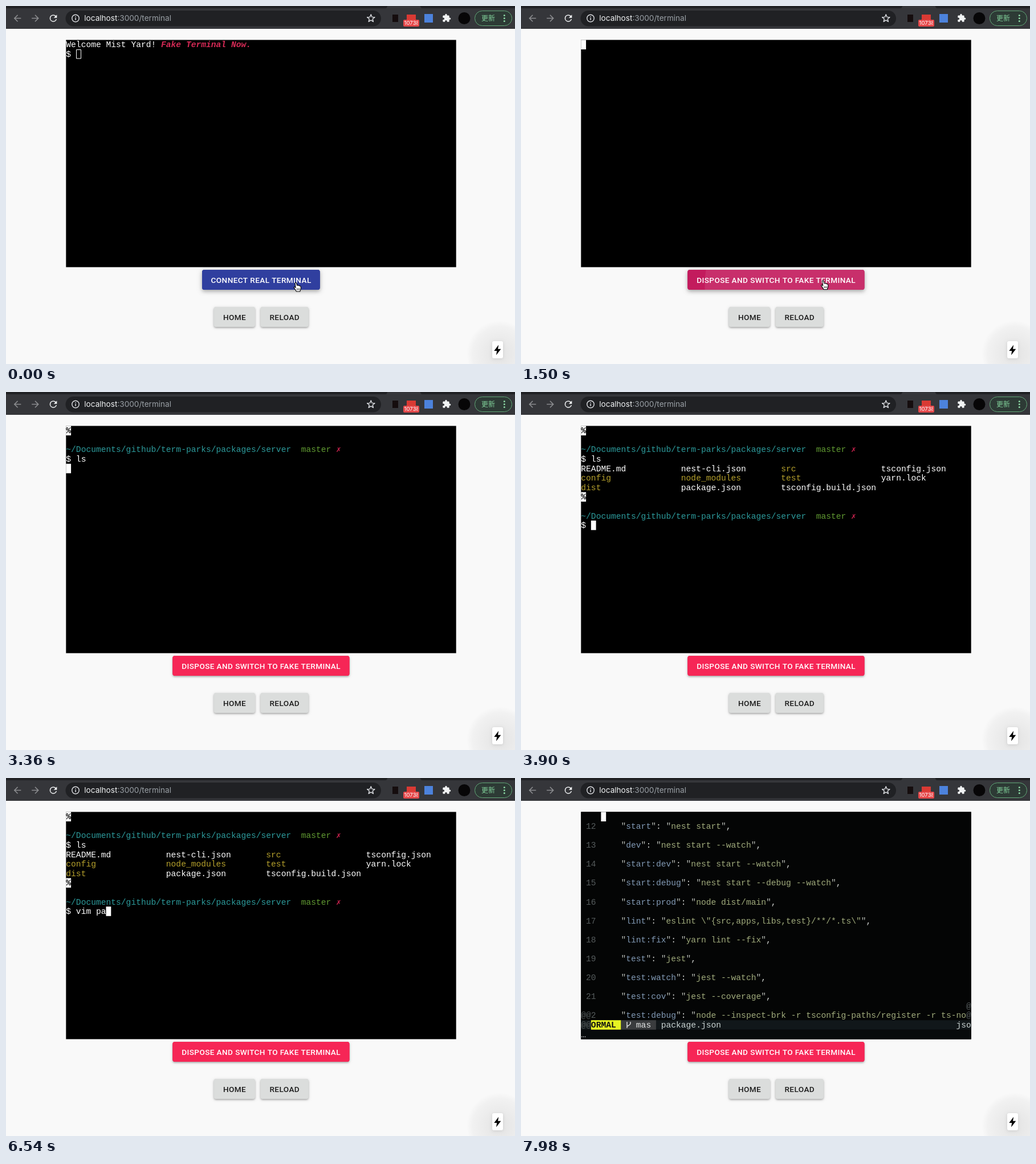
An HTML page with a canvas for the animation above (8 s loop, 893 by 627 pixels).

```html
<!DOCTYPE html>
<html lang="en">
<head>
<meta charset="utf-8">
<title>Web terminal</title>
<style>
html, body { margin: 0; width: 100%; height: 100%; overflow: hidden; background: #f9f9f9; }
canvas { display: block; width: 893px; height: 627px; }
</style>
</head>
<body>
<canvas id="stage"></canvas>
<script>
const W = 893, H = 627, LOOP = 8000, STEP = 60;
const canvas = document.getElementById('stage');
const ctx = canvas.getContext('2d');
const dpr = window.devicePixelRatio || 1;
canvas.width = W * dpr;
canvas.height = H * dpr;

const TERM = { x: 105.3, y: 59.4, w: 684.4, h: 398, cw: 8.775, ch: 16.58 };
const MONO = '14.63px "Liberation Mono", monospace';
const WHITE = '#ffffff', YELLOW = '#b5a02c', TEAL = '#2c9a9b';

// ---------- helpers ----------
const clamp = v => Math.max(0, Math.min(1, v));
const span = (t, a, b) => clamp((t - a) / (b - a));
const lerp = (a, b, k) => a + (b - a) * k;
const mix = (a, b, k) => `rgb(${a.map((v, i) => Math.round(lerp(v, b[i], k))).join(',')})`;

// cubic-bezier(.4, 0, .2, 1)
function ease(x) {
  let lo = 0, hi = 1, u = x;
  for (let i = 0; i < 24; i++) {
    u = (lo + hi) / 2;
    const v = 1 - u;
    if (1.2 * u * v * v + 0.6 * u * u * v + u * u * u < x) lo = u; else hi = u;
  }
  return 3 * u * u * (1 - u) + u * u * u;
}

function rect(x, y, w, h, color) {
  ctx.fillStyle = color;
  ctx.fillRect(x, y, w, h);
}

function round(x, y, w, h, r, color) {
  ctx.beginPath();
  ctx.roundRect(x, y, w, h, r);
  ctx.fillStyle = color;
  ctx.fill();
}

function disc(x, y, r, color) {
  ctx.beginPath();
  ctx.arc(x, y, r, 0, Math.PI * 2);
  ctx.fillStyle = color;
  ctx.fill();
}

function label(s, x, y, font, color, align = 'left', spacing = 0) {
  ctx.font = font;
  ctx.fillStyle = color;
  ctx.textAlign = align;
  ctx.letterSpacing = spacing + 'px';
  ctx.fillText(s, x, y);
  ctx.letterSpacing = '0px';
}

// 24-unit icon centred on a point
function icon(d, x, y, size, color) {
  ctx.save();
  ctx.translate(x - size / 2, y - size / 2);
  ctx.scale(size / 24, size / 24);
  ctx.fillStyle = color;
  ctx.fill(new Path2D(d));
  ctx.restore();
}

function withShadow(alpha, blur, dy, draw) {
  ctx.save();
  ctx.shadowColor = `rgba(0,0,0,${alpha})`;
  ctx.shadowBlur = blur * dpr;
  ctx.shadowOffsetY = dy * dpr;
  draw();
  ctx.restore();
}

// ---------- browser bar ----------
const ICONS = {
  back: 'M20 11H7.83l5.59-5.59L12 4l-8 8 8 8 1.41-1.41L7.83 13H20z',
  next: 'M12 4l-1.41 1.41L16.17 11H4v2h12.17l-5.58 5.59L12 20l8-8z',
  reload: 'M17.65 6.35A7.96 7.96 0 0 0 12 4a8 8 0 1 0 7.73 10h-2.08A6 6 0 1 1 12 6c1.66 0 3.14.69 4.22 1.78L13 11h7V4z',
  puzzle: 'M20.5 11H19V7c0-1.1-.9-2-2-2h-4V3.5a2.5 2.5 0 0 0-5 0V5H4c-1.1 0-2 .9-2 2v3.8h1.5a2.7 2.7 0 0 1 0 5.4H2V20c0 1.1.9 2 2 2h3.8v-1.5a2.7 2.7 0 0 1 5.4 0V22H17c1.1 0 2-.9 2-2v-4h1.5a2.5 2.5 0 0 0 0-5z',
  bolt: 'M14.5 0L4 14h6.5L9 24 20 9.5h-7z'
};

function star(x, y, r) {
  ctx.beginPath();
  for (let i = 0; i < 10; i++) {
    const a = -Math.PI / 2 + i * Math.PI / 5, q = i % 2 ? r * 0.43 : r;
    ctx.lineTo(x + Math.cos(a) * q, y + Math.sin(a) * q);
  }
  ctx.closePath();
  ctx.strokeStyle = '#dfe1e5';
  ctx.lineWidth = 1.4;
  ctx.lineJoin = 'round';
  ctx.stroke();
}

function browserBar() {
  rect(0, 0, W, 40, '#35363a');
  round(-5, -5, 674, 9, 4, '#202124');
  round(727, -5, 180, 9, 4, '#202124');
  icon(ICONS.back, 20, 21.5, 19, '#8b8c8f');
  icon(ICONS.next, 51.5, 21.5, 19, '#8b8c8f');
  icon(ICONS.reload, 83, 21.5, 19, '#f1f3f4');

  round(104.5, 8, 553.5, 27.5, 13.75, '#202124');
  ctx.beginPath();
  ctx.arc(122, 21.5, 6.2, 0, 7);
  ctx.strokeStyle = '#dfe1e5';
  ctx.lineWidth = 1.4;
  ctx.stroke();
  rect(121.3, 20.7, 1.5, 4, '#dfe1e5');
  rect(121.3, 18, 1.5, 1.5, '#dfe1e5');
  const font = '13.6px Inter, sans-serif';
  label('localhost', 137.3, 26.3, font, '#f1f3f4');
  const w = ctx.measureText('localhost').width;
  label(':3000/terminal', 137.3 + w, 26.3, font, '#9aa0a6');
  star(640.3, 21.8, 7);

  rect(678, 15, 10, 13, '#150d0e');
  rect(703, 15, 16, 11, '#d93a34');
  round(697, 24, 28, 12, 2, '#e5484a');
  ctx.save();
  ctx.beginPath();
  ctx.rect(697, 23, 25.5, 13);
  ctx.clip();
  label('10738', 698.6, 33.4, '9.6px Inter, sans-serif', WHITE);
  ctx.restore();
  rect(734, 14, 15, 15, '#4c82dc');
  icon(ICONS.puzzle, 773, 21.2, 16, '#f1f3f4');
  disc(804, 21.5, 10.5, '#070607');

  round(822.5, 8.5, 65, 26, 13, '#2d3a35');
  ctx.strokeStyle = '#62a878';
  ctx.lineWidth = 1;
  ctx.stroke();
  label('更新', 834, 26, '12px "Noto Sans CJK SC", "Noto Sans CJK JP", sans-serif', '#81d09a');
  for (const y of [16.5, 21.5, 26.5]) disc(874.3, y, 1.5, '#8bd6a3');
}

// ---------- page furniture ----------
function badge() {
  const g = ctx.createRadialGradient(866, 609, 15, 866, 609, 58);
  g.addColorStop(0, 'rgba(0,0,0,.07)');
  g.addColorStop(0.75, 'rgba(0,0,0,.03)');
  g.addColorStop(1, 'rgba(0,0,0,0)');
  rect(800, 545, 93, 82, g);
  withShadow(0.12, 5, 1, () => round(853, 587, 19, 30, 3, WHITE));
  icon(ICONS.bolt, 862.3, 602.5, 18, '#000');
}

function button(x, y, w, text, fill, ink, lift = 0) {
  const body = () => round(x, y, w, 35, 4, fill);
  withShadow(0.22, lerp(3, 6, lift), lerp(2, 3.5, lift), body);
  withShadow(0.14, lerp(5, 9, lift), 1, body);
  label(text, x + w / 2 + 0.2, y + 22.7, '500 13.6px Roboto, sans-serif', ink, 'center', 0.39);
}

const BLUE = [48, 63, 159], PINK_DARK = [195, 27, 93], PINK = [246, 38, 86];
const PRESS = 1200, SWITCH = 1260, LEAVE = 2450;

function ripple(t, x, w, cx) {
  if (t < PRESS || t > SWITCH + 550) return;
  const k = ease(span(t, PRESS, PRESS + 550));
  const fade = 1 - ease(span(t, SWITCH, SWITCH + 550));
  ctx.save();
  ctx.beginPath();
  ctx.roundRect(x, 462, w, 35, 4);
  ctx.clip();
  disc(cx, 488, 191 * k, `rgba(255,255,255,${lerp(0.1, 0.3, k) * fade})`);
  ctx.restore();
}

function mainButton(t) {
  const real = t >= SWITCH;
  const x = real ? 292.3 : 344, w = real ? 310.2 : 206.8;
  const leave = ease(span(t, LEAVE, LEAVE + 250));
  const fill = !real ? mix(BLUE, BLUE, 0)
    : t < LEAVE ? mix(BLUE, PINK_DARK, ease(span(t, SWITCH, SWITCH + 250)))
    : mix(PINK_DARK, PINK, leave);
  const text = real ? 'DISPOSE AND SWITCH TO FAKE TERMINAL' : 'CONNECT REAL TERMINAL';
  button(x, 462, w, text, fill, WHITE, 1 - leave);
  ripple(t, x, w, x + 188);
}

// ---------- terminal ----------
const colX = c => TERM.x + c * TERM.cw;
const rowY = r => TERM.y + r * TERM.ch;

function put(r, c, s, color = WHITE, style = '') {
  ctx.font = style + ' ' + MONO;
  ctx.fillStyle = color;
  ctx.textAlign = 'left';
  [...s].forEach((ch, i) => {
    if (ch !== ' ') ctx.fillText(ch, colX(c + i), rowY(r) + 12.9);
  });
}

function cells(r, c, n, color) {
  rect(colX(c), rowY(r), n * TERM.cw, TERM.ch, color);
}

function prompt(r) {
  cells(r, 0, 1, WHITE);
  put(r, 0, '%', '#000', 'bold');
  put(r + 2, 0, '~/Documents/github/term-parks/packages/server', TEAL);
  put(r + 2, 47, 'master', '#619b32');
  label('✗', colX(54), rowY(r + 2) + 12.9, '14px "DejaVu Sans Mono", monospace', '#cc234f');
  put(r + 3, 0, '$');
}

const FILES = [
  ['README.md', 'nest-cli.json', '*src', 'tsconfig.json'],
  ['*config', '*node_modules', '*test', 'yarn.lock'],
  ['*dist', 'package.json', 'tsconfig.build.json']
];

function listing(r) {
  FILES.forEach((line, i) => line.forEach((name, j) => {
    const dir = name[0] === '*';
    put(r + i, j * 20, dir ? name.slice(1) : name, dir ? YELLOW : WHITE);
  }));
}

// key press times for each typed character
const typed = (text, times, t) => text.slice(0, times.filter(k => t >= k).length);
const LS_KEYS = [2940, 3060];
const VIM_KEYS = [6120, 6240, 6300, 6420, 6480, 6540, 6660, 6720];
const ENTER_LS = 3240, LIST = 3420, TAB = 7020, ENTER_VIM = 7320, CLEAR = 7500, VIM = 7620;
const DARK = [[2400, 2940], [3960, 4560], [5100, 5580]];

function shell(t) {
  const lit = !DARK.some(([a, b]) => t >= a && t < b);
  const cursor = (r, c) => lit && cells(r, c, 1, WHITE);
  if (t < SWITCH) {
    put(0, 0, 'Welcome Mist Yard!');
    put(0, 19, 'Fake Terminal Now.', '#d62a56', 'italic bold');
    put(1, 0, '$');
    ctx.strokeStyle = WHITE;
    ctx.lineWidth = 1;
    ctx.strokeRect(123.5, 76.5, 8, 15.5);
    return;
  }
  if (t < 1800) return cursor(0, 0);
  prompt(0);
  const ls = typed('ls', LS_KEYS, t);
  put(3, 2, ls);
  if (t < ENTER_LS) return cursor(3, 2 + ls.length);
  if (t < LIST) return cursor(4, 0);
  listing(4);
  prompt(7);
  const cmd = t >= TAB ? 'vim package.json ' : typed('vim pack', VIM_KEYS, t);
  put(10, 2, cmd);
  if (t < ENTER_VIM) cursor(10, 2 + cmd.length); else cursor(11, 0);
}

const SCRIPTS = [
  ['start', 'nest start'],
  ['dev', 'nest start --watch'],
  ['start:dev', 'nest start --watch'],
  ['start:debug', 'nest start --debug --watch'],
  ['start:prod', 'node dist/main'],
  ['lint', 'eslint \\"{src,apps,libs,test}/**/*.ts\\"'],
  ['lint:fix', 'yarn lint --fix'],
  ['test', 'jest'],
  ['test:watch', 'jest --watch'],
  ['test:cov', 'jest --coverage'],
  ['test:debug', 'node --inspect-brk -r tsconfig-paths/register -r ts-no']
];

function editor() {
  const quote = '#b4b8b2', dim = '#555b5c';
  rect(TERM.x, TERM.y, TERM.w, TERM.h, '#040505');
  cells(0, 4, 1, WHITE);
  SCRIPTS.forEach(([key, value], i) => {
    const r = 1 + i * 2, last = i === SCRIPTS.length - 1;
    let c = 8;
    const add = (s, color) => { put(r, c, s, color); c += s.length; };
    if (last) put(r, 0, '@@2', dim);
    else put(r, 1, String(12 + i), dim);
    add('"', quote);
    add(key, '#8199b4');
    add('"', quote);
    add(': ', '#d0d3d0');
    add('"', quote);
    add(value, '#a0ab7c');
    if (!last) {
      add('"', quote);
      if (i < SCRIPTS.length - 1) add(',', '#d0d3d0');
    }
  });
  put(20, 77, '@', dim);
  put(21, 77, '@', dim);
  rect(TERM.x, rowY(22), TERM.w, TERM.ch, '#11171a');
  rect(TERM.x, rowY(23), TERM.w, TERM.ch, '#080b0c');
  put(22, 0, '@@', dim);
  cells(22, 2, 6, '#e6f322');
  put(22, 2, 'ORMAL', '#111', 'bold');
  cells(22, 8, 7, '#3a3c3e');
  ctx.beginPath();
  ctx.moveTo(186, 427);
  ctx.lineTo(186, 438);
  ctx.moveTo(192, 427);
  ctx.lineTo(192, 430);
  ctx.quadraticCurveTo(192, 432, 186, 435);
  ctx.strokeStyle = '#e4e6e6';
  ctx.lineWidth = 1.4;
  ctx.stroke();
  put(22, 11, 'mas', '#e4e6e6');
  put(22, 16, 'package.json', '#c9d3d2');
  put(22, 75, 'jso', '#c9d3d2');
  put(23, 0, '…', '#d8d8d8');
}

function terminal(t) {
  rect(TERM.x, TERM.y, TERM.w, TERM.h, '#000');
  if (t < CLEAR) shell(t);
  else if (t < VIM) cells(0, 0, 1, WHITE);
  else editor();
}

// ---------- mouse pointer ----------
const HAND = new Path2D('M-4 -6.5C-4 -8 -1.8 -8 -1.4 -6.6L-.5 -2.6C.2 -3.4 1.8 -3.2 2 -2.2C2.8 -2.8 4.2 -2.4 4.3 -1.4C5.2 -1.8 6.3 -1.2 6.3 0L6.3 2.6C6.3 5 5 5.6 4.8 8L-1.8 8C-2 6 -4.6 3.6 -5.6 1.4C-6.2 0 -4.6 -.6 -3.4 .8L-2.8 1.4Z');
const BEAM = new Path2D('M-4 -8H-1.2L0 -7L1.2 -8H4M0 -7V7M-4 8H-1.2L0 7L1.2 8H4M-2 2H2');

function pointer(t) {
  if (t >= LS_KEYS[0]) return;
  const a = span(t, 0, 240), b = span(t, 960, 1200), c = span(t, 1860, 2160);
  let x = 511 + 14 * a + 7.5 * b + 5 * c;
  let y = 492 - 2 * a - 1.5 * b - 6 * c;
  const up = span(t, 2340, 2400), on = ease(span(t, 2460, 2820));
  ctx.save();
  ctx.lineJoin = 'round';
  if (t < 2460) {
    ctx.translate(x, y - 10 * up);
    ctx.fillStyle = WHITE;
    ctx.fill(HAND);
    ctx.strokeStyle = '#000';
    ctx.lineWidth = 1.1;
    ctx.stroke(HAND);
    ctx.beginPath();
    for (const i of [-0.4, 1.7, 3.8]) {
      ctx.moveTo(i, 2.4);
      ctx.lineTo(i, 5.6);
    }
    ctx.lineWidth = 0.8;
    ctx.stroke();
  } else {
    ctx.translate(542 + 4 * on, 429.5 - 90 * on);
    ctx.strokeStyle = WHITE;
    ctx.lineWidth = 3;
    ctx.stroke(BEAM);
    ctx.strokeStyle = '#000';
    ctx.lineWidth = 1.1;
    ctx.stroke(BEAM);
  }
  ctx.restore();
}

function draw(t) {
  ctx.setTransform(dpr, 0, 0, dpr, 0, 0);
  rect(0, 0, W, H, '#f9f9f9');
  browserBar();
  badge();
  terminal(t);
  mainButton(t);
  button(364.7, 527, 72.3, 'HOME', '#dbdddc', '#1c1c1c');
  button(446.5, 527, 84.2, 'RELOAD', '#dbdddc', '#1c1c1c');
  pointer(t);
}

const start = performance.now();
function tick() {
  const t = (performance.now() - start) % LOOP;
  draw(Math.floor(t / STEP) * STEP);
  requestAnimationFrame(tick);
}
tick();
</script>
</body>
</html>
```
